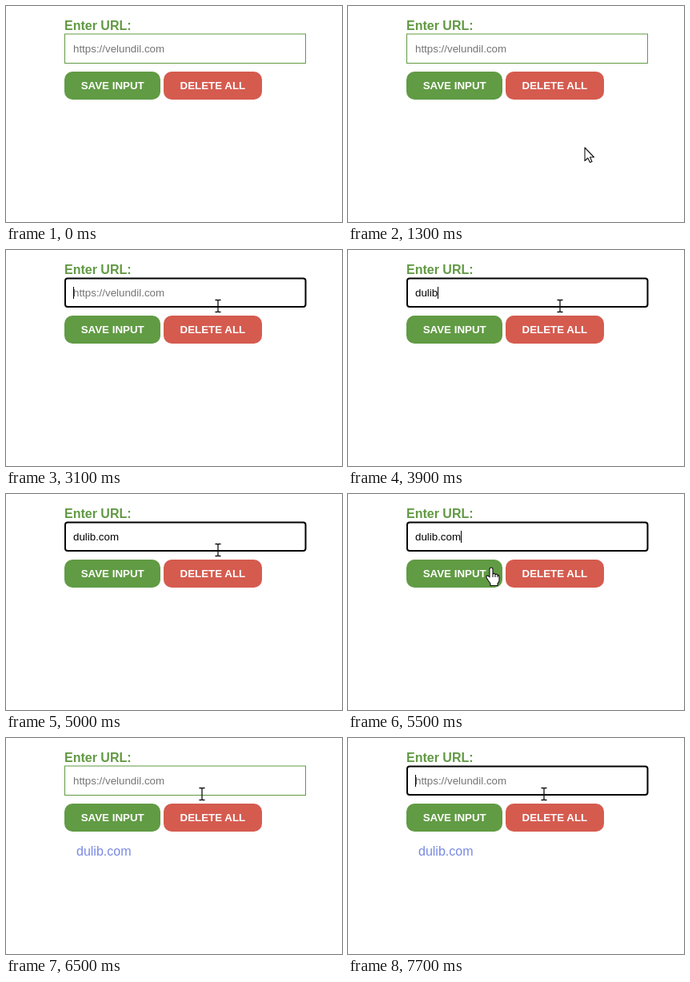
These frames come from a looping animation (420 px wide and 270 px high, 8 s). An HTML page:

```html
<!DOCTYPE html>
<html lang="en">
<head>
<meta charset="utf-8">
<title>Save links</title>
<style>
  html, body { margin: 0; width: 100%; height: 100%; overflow: hidden; background: #fff; }
  svg { display: block; width: 420px; height: 270px; }
  text { font: 13.333px Arial, "Liberation Sans", sans-serif; white-space: pre; }
  .big { font-size: 16px; }
  .bold { font-weight: bold; }
  .cursor { fill: #fff; stroke: #111; stroke-width: 1.1; stroke-linejoin: round; }
</style>
</head>
<body>
<svg viewBox="0 0 420 270">
  <text class="big bold" x="73" y="30" fill="#619a43">Enter URL:</text>

  <rect id="border" x="73.5" y="35" width="301" height="36.5" fill="none" stroke="#619a43"/>
  <rect id="ring" x="74" y="35.5" width="300.5" height="35.5" rx="3" fill="none" stroke="#000" stroke-width="2"/>
  <text id="entry" x="84" y="58"></text>
  <rect id="caret" y="46" width="1" height="15"/>

  <rect x="73" y="82" width="120" height="35" rx="10" fill="#619b44"/>
  <text class="bold" x="93.7" y="104" fill="#fff">SAVE INPUT</text>
  <rect x="197" y="82" width="123" height="35" rx="10" fill="#d55b4f"/>
  <text class="bold" x="217.5" y="104" fill="#fff">DELETE ALL</text>

  <text id="saved" class="big" x="88" y="147" fill="#7989e2">dulib.com</text>

  <g id="mouse">
    <path id="arrow" class="cursor" d="M0 0V16.5L3.8 13L6.5 18.5L9 17.5L6.5 12H11.5Z"/>
    <path id="beam" fill="none" stroke="#111" stroke-width="1.3"
      d="M-3.5 -7.5H-1Q0 -7.5 0 -6.5Q0 -7.5 1 -7.5H3.5M0 -6.5V6.5M-3.5 7.5H-1Q0 7.5 0 6.5Q0 7.5 1 7.5H3.5"/>
    <path id="hand" class="cursor" d="M-2 2Q-2 0 0 0Q2 0 2 2V8Q4 6.5 5 8.5Q7 7.5 8 9.5Q10 9 10 11.5V16
      Q10 18 8 20V22.5H-1V20Q-4 16 -6 12.5Q-6.5 10 -4.5 10Q-3 10.5 -2 12ZM2 8V12M5 8.5V12M8 9.5V12"/>
  </g>
</svg>
<script>
const LOOP = 8000, TICK = 100;
const HINT = 'https://velundil.com', LINK = 'dulib.com';
const APPEAR = 500, FOCUS = 3100, SAVE = 5600, REFOCUS = 6600;

// pointer glides: begin, end, x, y, sideways bulge
const glides = [
  [900, 1800, 262, 71, 22],
  [3000, FOCUS, 265, 70, 0],
  [5100, SAVE, 169, 95, 0],
  [5900, 6400, 245, 70, 50]
];

const el = id => document.getElementById(id);
const show = (id, on) => { el(id).style.display = on ? '' : 'none'; };
const within = (v, a, b) => v >= a && v < b;
const clamp = (v, lo, hi) => Math.min(hi, Math.max(lo, v));
const ease = k => k * k * (3 - 2 * k);

function pointer(t) {
  let x = 284, y = 252;
  for (const [begin, end, toX, toY, bulge] of glides) {
    const k = ease(clamp((t - begin) / (end - begin), 0, 1));
    x += (toX - x) * k + bulge * Math.sin(Math.PI * k);
    y += (toY - y) * k;
  }
  return [Math.round(x), Math.round(y)];
}

function cursorAt(x, y) {
  if (within(x, 72, 376) && within(y, 34, 72)) return 'beam';
  if (within(y, 82, 117) && (within(x, 73, 193) || within(x, 197, 320))) return 'hand';
  return 'arrow';
}

function drawMouse(t) {
  const [x, y] = pointer(t);
  const kind = cursorAt(x, y);
  for (const id of ['arrow', 'beam', 'hand']) show(id, id === kind);
  show('mouse', t >= APPEAR);
  el('mouse').setAttribute('transform', `translate(${x} ${y})`);
}

// letters typed so far in a burst of n, one every gap ms
const burst = (t, begin, n, gap) => clamp(Math.floor((t - begin) / gap) + 1, 0, n);

function typedText(t) {
  if (t >= SAVE) return '';
  return LINK.slice(0, burst(t, 3200, 2, 100) + burst(t, 3500, 4, 160) + burst(t, 4200, 3, 100));
}

function drawInput(t) {
  const typed = typedText(t);
  const entry = el('entry');
  entry.textContent = typed || HINT;
  entry.setAttribute('fill', typed ? '#000' : '#757575');

  const focused = within(t, FOCUS, SAVE) || t >= REFOCUS;
  show('ring', focused);
  show('border', !focused);

  const blinkOff = within(t, 5000, 5500) || within(t, 7100, 7700);
  show('caret', focused && !blinkOff);
  const width = typed ? entry.getComputedTextLength() : 0;
  el('caret').setAttribute('x', Math.floor(84 + width));
}

function draw(now) {
  const t = Math.floor(now % LOOP / TICK) * TICK;
  drawInput(t);
  show('saved', t >= SAVE);
  drawMouse(t);
}

const start = performance.now();
function frame() {
  draw(performance.now() - start);
  requestAnimationFrame(frame);
}
frame();
</script>
</body>
</html>
```
